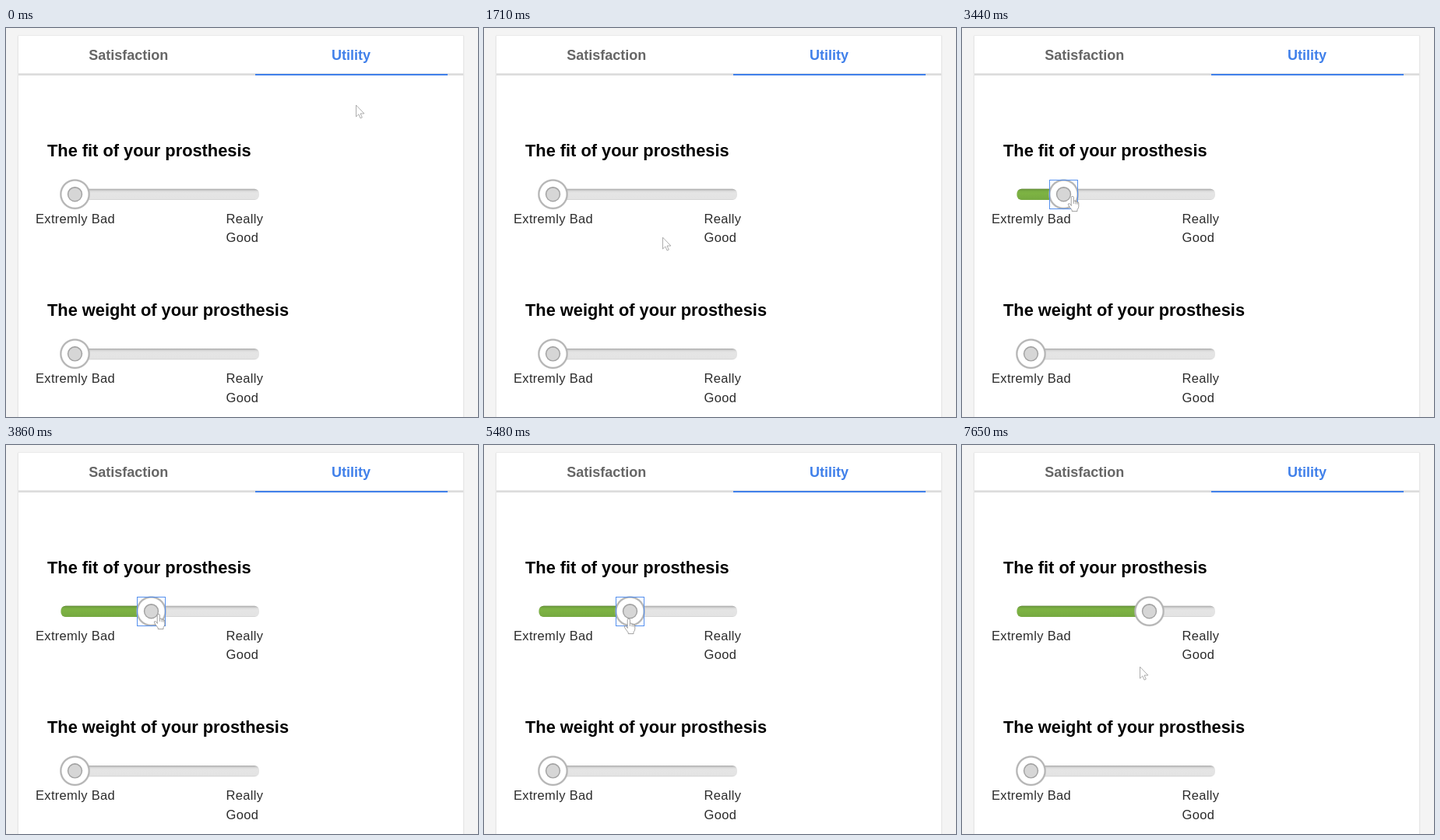
Recreate the animation shown at these times as an HTML page. Size 606 by 500 pixels, loop 8.21 s.

```html
<!DOCTYPE html>
<html lang="en">
<head>
<meta charset="utf-8">
<title>Slider survey</title>
<style>
html, body { margin: 0; width: 100%; height: 100%; overflow: hidden; background: #f4f4f4; }
svg { display: block; width: 606px; height: 500px; font-family: "Liberation Sans", Arial, sans-serif; }
.tab { font-weight: bold; font-size: 18px; text-anchor: middle; }
.title { font-weight: bold; font-size: 21.8px; fill: #000; }
.label { font-size: 16.5px; letter-spacing: .32px; fill: #2c2c2c; }
</style>
</head>
<body>
<svg viewBox="0 0 606 500">
  <defs>
    <linearGradient id="gray" x2="0" y2="1">
      <stop offset="0" stop-color="#a8a8a8"/>
      <stop offset=".22" stop-color="#dedede"/>
      <stop offset=".4" stop-color="#e5e5e5"/>
      <stop offset=".9" stop-color="#e3e3e3"/>
      <stop offset="1" stop-color="#cfcfcf"/>
    </linearGradient>
    <linearGradient id="green" x2="0" y2="1">
      <stop offset="0" stop-color="#658f39"/>
      <stop offset=".2" stop-color="#79ad42"/>
      <stop offset=".4" stop-color="#7db343"/>
      <stop offset="1" stop-color="#76a941"/>
    </linearGradient>
    <radialGradient id="ring">
      <stop offset=".82" stop-color="#fff"/>
      <stop offset=".88" stop-color="#b4b4b4"/>
      <stop offset=".93" stop-color="#b4b4b4"/>
      <stop offset="1" stop-color="#b4b4b4" stop-opacity="0"/>
    </radialGradient>
    <g id="knob">
      <circle r="20" fill="url(#ring)"/>
      <circle r="9.7" fill="#a2a2a2"/>
      <circle r="8.2" cy=".2" fill="#d6d6d6"/>
    </g>
    <g id="panel">
      <rect x="70.5" y="206.7" width="254.5" height="14.3" rx="6" fill="url(#gray)"/>
      <text class="label" x="38" y="251.2">Extremly Bad</text>
      <text class="label" x="282.5" y="251.2">Really</text>
      <text class="label" x="282.5" y="275.4">Good</text>
    </g>
  </defs>

  <rect width="606" height="500" fill="#f4f4f4"/>
  <rect x="14.5" y="9" width="574" height="500" rx="2" fill="#ececec"/>
  <rect x="15.5" y="9.7" width="572" height="500" rx="1" fill="#dfdfdf"/>
  <rect x="16" y="10" width="571" height="500" fill="#fff"/>
  <rect x="16" y="58.3" width="571" height="2.7" fill="#dcdcdc"/>
  <rect x="320" y="59" width="247" height="2" fill="#4080ea"/>
  <text class="tab" x="157.3" y="40.6" fill="#666">Satisfaction</text>
  <text class="tab" x="443" y="40.6" fill="#4080ea">Utility</text>

  <text class="title" x="53" y="165.3">The fit of your prosthesis</text>
  <use href="#panel"/>
  <rect id="fill" x="70.5" y="206.7" height="14.3" rx="6" fill="url(#green)"/>
  <use id="handle" href="#knob"/>
  <rect id="focus" y="195.5" width="36" height="37" fill="none" stroke="#5590ee"/>

  <text class="title" x="53" y="370.3">The weight of your prosthesis</text>
  <use href="#panel" y="205.2"/>
  <use href="#knob" x="88.5" y="418.8"/>

  <g id="cursor" fill="#fff" stroke-linejoin="round" stroke-linecap="round">
    <path id="arrow" stroke="#999" stroke-width=".8"
      d="M.5.5V15L3.8 11.9 6.1 17 8.3 16 6 11H10.5Z"/>
    <g id="hand" stroke="#8a8a8a" stroke-width=".8">
      <path d="M-1.8 12V1.8Q-1.8.4-.2.4 1.4.4 1.4 1.8V6.3Q3.8 5.2 4 7.2 6 6 6.1 8 7.8 7.4 7.8 9V13.5Q7.6 16 6 17.5V19.6H-.8V18Q-3.5 15-5.6 11.2-6 9.4-4.4 9.6-3 10-1.8 12Z"/>
      <path fill="none" d="M1.4 6.5V9.5M4 7.2V10M6.1 8V10.3"/>
    </g>
  </g>
</svg>
<script>
const LOOP = 8210, TICK = 46.9, PRESS = 2825, RELEASE = 7040, BLUR = 7600;
const REST = 88.5, GRAB = 3, LAG = 60;
const el = id => document.getElementById(id);

// Key points: time, x, y. The pointer comes in, drags the knob, then leaves.
const approach = [
  [530, 449, 99], [1400, 362, 317], [1710, 233, 271], [2170, 110, 218], [2580, 95, 215]
];
const drag = [
  [3030, 93.5, 215], [3860, 184.5, 217], [4560, 251.5, 226], [5480, 187.5, 223],
  [5810, 164.5, 222], [6360, 217.5, 219], [RELEASE, 240.5, 224]
];
const leave = [[RELEASE, 243.5, 224], [7630, 228, 285]];

// Smooth curve through the keys that never overshoots them.
function curve(keys, t, c) {
  const last = keys.length - 1;
  if (t <= keys[0][0]) return keys[0][c];
  if (t >= keys[last][0]) return keys[last][c];
  const i = keys.findIndex(k => k[0] > t) - 1;
  const slope = j => (keys[j + 1][c] - keys[j][c]) / (keys[j + 1][0] - keys[j][0]);
  const tangent = j => {
    if (j === 0 || j === last) return 0;
    const a = slope(j - 1), b = slope(j);
    return a * b <= 0 ? 0 : 2 * a * b / (a + b);
  };
  const [p, q] = [keys[i], keys[i + 1]];
  const d = q[0] - p[0], u = (t - p[0]) / d, v = 1 - u;
  return p[c] * v * v * (1 + 2 * u) + q[c] * u * u * (1 + 2 * v)
    + d * u * v * (tangent(i) * v - tangent(i + 1) * u);
}

// While dragging, the pointer runs slightly ahead of the knob.
function pointerAt(t) {
  if (t < PRESS) return [curve(approach, t, 1), curve(approach, t, 2)];
  if (t < RELEASE) return [curve(drag, t + LAG, 1) + GRAB, curve(drag, t, 2)];
  return [curve(leave, t, 1), curve(leave, t, 2)];
}

function show(node, on) {
  node.setAttribute("visibility", on ? "visible" : "hidden");
}

function draw(time) {
  // The screen refreshes in even steps.
  const t = 550 + Math.round((time - 550) / TICK) * TICK;
  const [x, y] = pointerAt(t).map(Math.round);
  const pressed = t >= PRESS;
  const knob = pressed ? Math.round(curve(drag, t, 1) - .5) + .5 : REST;
  const over = pressed && t < RELEASE || Math.hypot(x - knob, y - 213.5) < 20;

  el("handle").setAttribute("transform", `translate(${knob} 213.7)`);
  el("fill").setAttribute("width", knob - 70.5);
  show(el("fill"), pressed);
  el("focus").setAttribute("x", knob - 18);
  show(el("focus"), pressed && t < BLUR);
  el("cursor").setAttribute("transform", `translate(${x} ${y})`);
  show(el("arrow"), !over);
  show(el("hand"), over);
}

const start = performance.now();
function tick() {
  draw((performance.now() - start) % LOOP);
  requestAnimationFrame(tick);
}
tick();
</script>
</body>
</html>
```
